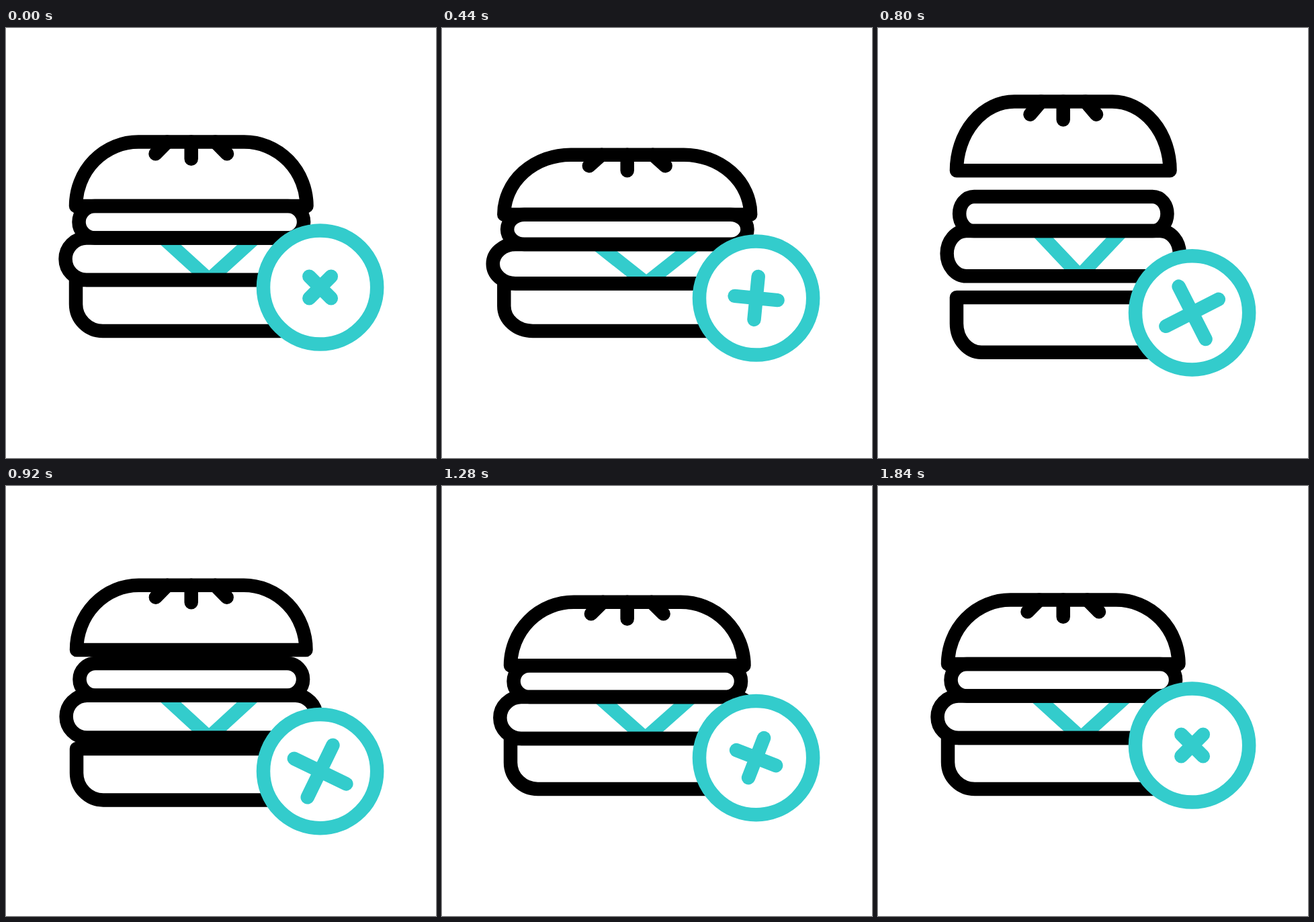
Recreate the animation shown at these times as an HTML page. Size 640x640 px, loop 1880 ms.

```html
<!DOCTYPE html>
<html lang="en">
<head>
<meta charset="utf-8">
<title>Burger</title>
<style>
  html, body { margin: 0; width: 100%; height: 100%; overflow: hidden; background: #fff; }
  svg { display: block; width: 640px; height: 640px; }
  path, rect, circle {
    fill: none; stroke: #000; stroke-width: 20.5;
    stroke-linecap: round; stroke-linejoin: round;
    vector-effect: non-scaling-stroke;
  }
  .teal { stroke: #33cccc; }
  .cheese { stroke-linecap: butt; }
  .disc { fill: #fff; }
</style>
</head>
<body>
<svg viewBox="0 0 640 640">
  <g id="middle">
    <path class="teal cheese" d="M234 312.5 L302.3 374.5 L370.6 312.5"/>
    <rect x="108.5" y="265" width="334.6" height="47.5" rx="23.7"/>
    <rect x="88.5" y="312.5" width="374.4" height="62.5" rx="31.2"/>
  </g>
  <g id="top">
    <path d="M104 265 A93 95.5 0 0 1 197 169.5 H354.5 A93 95.5 0 0 1 447.5 265 Z"/>
    <path d="M222.5 187.3 L240 169.5 M275.7 169.5 V194.7 M329 187.3 L311.5 169.5"/>
  </g>
  <g id="base">
    <path d="M104 375 V411 A40 40 0 0 0 144 451 H407.5 A40 40 0 0 0 447.5 411 V375 Z"/>
  </g>
  <g id="badge">
    <circle class="teal disc" r="84.6"/>
    <path id="cross" class="teal"/>
  </g>
</svg>
<script>
  const LOOP = 1880, STEP = 40;
  const AXIS = 275.7, FLOOR = 451;

  // Key tables: [time, value]
  const squash = [[160, 0], [440, .068], [760, -.08], [1080, .068], [1360, 0]];
  const gap = [[440, 0], [760, 1], [1080, 0]];
  const drop = [[80, 0], [880, 38.6], [900, 38.6], [1640, .4], [1840, 0]];
  const arm = [[140, 23], [790, 44], [1680, 23]];
  const spin = [[80, 0], [280, -12], [600, -78], [800, -162], [1080, -241.6], [1520, -348.5], [1700, -360]];

  const $ = id => document.getElementById(id);

  // cubic-bezier(.42, 0, .58, 1)
  function ease(u) {
    let lo = 0, hi = 1, s = .5;
    for (let i = 0; i < 24; i++) {
      s = (lo + hi) / 2;
      const r = 1 - s;
      if (1.26 * s * r * r + 1.74 * s * s * r + s * s * s < u) lo = s; else hi = s;
    }
    return s * s * (3 - 2 * s);
  }

  // Runs mix(segment, progress), or holds the first or last value
  function along(keys, t, mix) {
    const last = keys.length - 1;
    if (t <= keys[0][0]) return keys[0][1];
    if (t >= keys[last][0]) return keys[last][1];
    const i = keys.findIndex(k => k[0] > t) - 1;
    return mix(i, (t - keys[i][0]) / (keys[i + 1][0] - keys[i][0]));
  }

  const eased = (keys, t) => along(keys, t, (i, u) =>
    keys[i][1] + (keys[i + 1][1] - keys[i][1]) * ease(u));

  // Smooth curve through all keys, at rest at both ends
  function flowing(keys, t) {
    const slope = i => i === 0 || i === keys.length - 1 ? 0 :
      (keys[i + 1][1] - keys[i - 1][1]) / (keys[i + 1][0] - keys[i - 1][0]);
    return along(keys, t, (i, u) => {
      const [t0, a] = keys[i], [t1, b] = keys[i + 1];
      const d = t1 - t0, r = 1 - u;
      return a * r * r * (1 + 2 * u) + b * u * u * (3 - 2 * u)
        + d * u * r * (slope(i) * r - slope(i + 1) * u);
    });
  }

  function draw(t) {
    const q = eased(squash, t), open = eased(gap, t);
    const sx = 1 + q, sy = 1 - q;
    const place = (id, dy) => $(id).setAttribute('transform',
      `matrix(${sx} 0 0 ${sy} ${AXIS * (1 - sx)} ${FLOOR * (1 - sy) + dy})`);
    place('top', -40 * open);
    place('middle', 0);
    place('base', 32.8 * open);

    const n = eased(arm, t);
    $('badge').setAttribute('transform', `translate(467.6 ${386 + eased(drop, t)})`);
    $('cross').setAttribute('d', `M${-n} 0 H${n} M0 ${-n} V${n}`);
    $('cross').setAttribute('transform', `rotate(${45 + flowing(spin, t)})`);
  }

  const start = performance.now();
  function tick() {
    const t = Math.max(0, performance.now() - start) % LOOP;
    draw(Math.floor(t / STEP) * STEP);
    requestAnimationFrame(tick);
  }
  tick();
</script>
</body>
</html>
```
